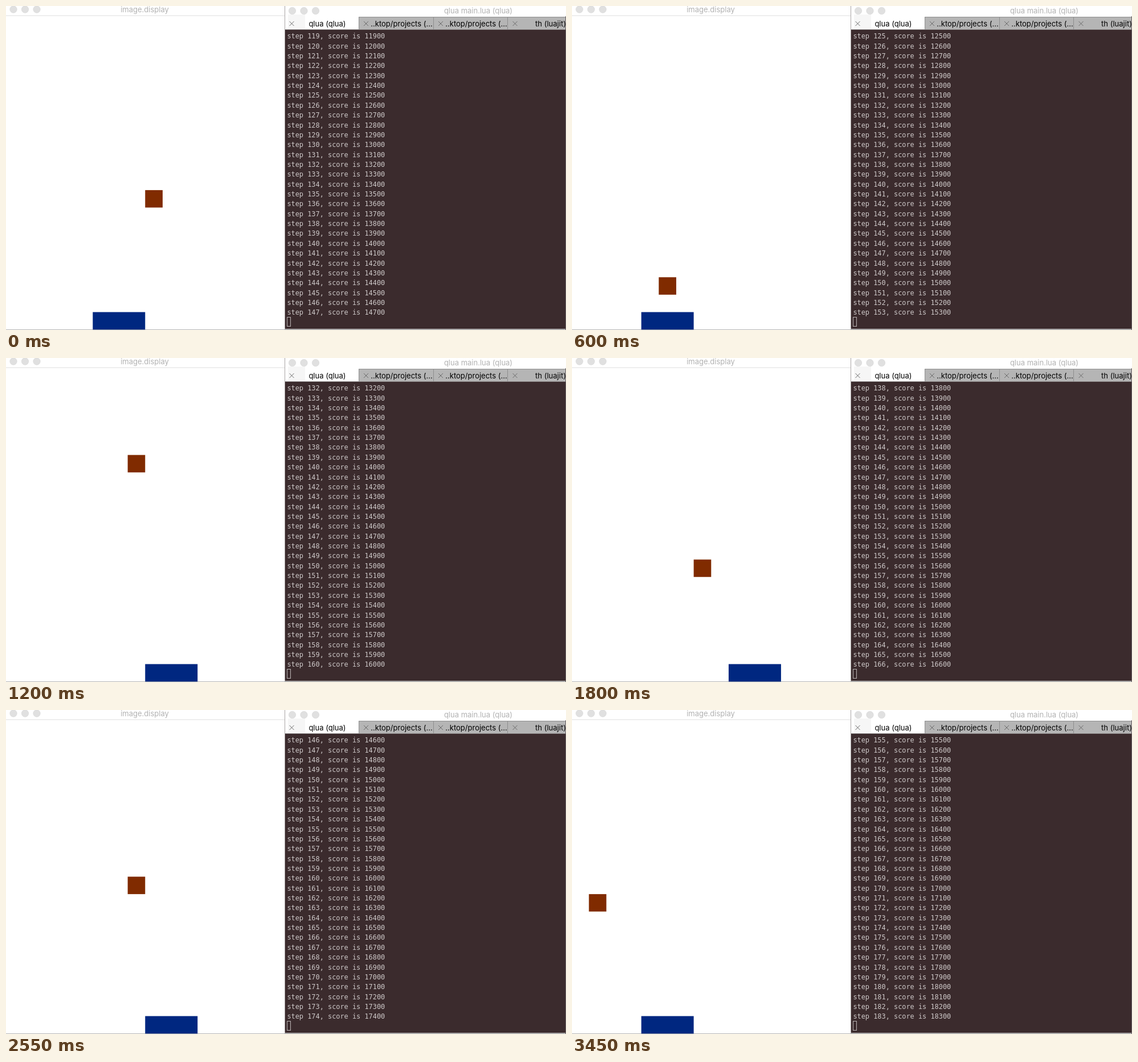
Recreate the animation shown at these times as an HTML page. Size 983 px wide and 570 px high, loop 3.6 s.

```html
<!DOCTYPE html>
<html lang="en">
<head>
<meta charset="utf-8">
<title>Catch</title>
<style>
  html, body { margin: 0; width: 100%; height: 100%; overflow: hidden; background: #fff; }
  svg { display: block; width: 983px; height: 570px; }
  .ui { font-family: Inter, Roboto, sans-serif; font-size: 13px; text-anchor: middle; }
  .title { fill: #b2b2b2; }
  .log { font-family: "DejaVu Sans Mono", monospace; font-size: 11.9px; fill: #cdc8c8; white-space: pre; }
</style>
</head>
<body>
<svg id="stage" viewBox="0 0 983 570" width="983" height="570"></svg>
<script>
const NS = "http://www.w3.org/2000/svg";
const stage = document.getElementById("stage");

function add(tag, attrs, text) {
  const el = document.createElementNS(NS, tag);
  for (const key in attrs) el.setAttribute(key, attrs[key]);
  if (text) el.textContent = text;
  return stage.appendChild(el);
}
const rect = (x, y, width, height, fill) => add("rect", { x, y, width, height, fill });
const label = (x, y, text, cls = "ui") => add("text", { x, y, class: cls }, text);
const lights = (xs, y) => xs.forEach(cx => add("circle", { cx, cy: y, r: 6.2, fill: "#e0e0e0", stroke: "#d6d6d6", "stroke-width": 0.6 }));

// Game window
const CELL = 30.66, TOP = 17.3;
rect(0, 0, 983, 570, "#fff");
lights([13, 33.5, 54], 6);
label(243.5, 11, "image.display", "ui title");
rect(0, 16.5, 489, 1, "#dedede");
rect(0, 569, 489, 1, "#b4b4b4");
const pad = rect(0, 538.5, CELL * 3, 30.7, "#002780");
const ball = rect(0, 0, CELL, CELL, "#802b00");

// Terminal window
rect(495, 15, 30, 26, "#f6f6f6");
lights([502.5, 523, 543.5], 8.5);
label(829, 13, "qlua main.lua (qlua)", "ui title");
rect(619, 19, 364, 22, "#b5b5b5");
rect(619, 19, 364, 1, "#8e8e8e");
[619, 750, 880].forEach(x => rect(x, 19, 1, 22, "#8e8e8e"));
const tabs = [[501.5, 564, "qlua (qlua)"], [632, 694.5, "..ktop/projects (..."],
  [763, 825.5, "..ktop/projects (..."], [893.5, 956, "th (luajit)"]];
tabs.forEach(([x, mid, text]) => {
  add("path", { d: `M${x - 4} 27l8 8m0-8l-8 8`, stroke: "#6c6c6c", "stroke-width": 1, fill: "none" });
  label(mid, 36, text);
});
rect(489, 41, 494, 1, "#8a8585");
rect(489, 42, 493, 526, "#3b2b2d");
rect(489, 0, 1, 570, "#a9a5a5");
rect(489, 568, 494, 1, "#d8d8d8");
rect(489, 569, 494, 1, "#8c8c8c");
rect(982, 18, 1, 552, "#6b6364");
add("rect", { x: 493.5, y: 547.5, width: 6, height: 16, fill: "none", stroke: "#b9b3b3" });

const LINES = 29;
const lines = Array.from({ length: LINES }, (_, i) => label(493.4, 57.3 + i * 17.357, "", "log"));

// One game per step; the ball falls one row per tick.
const LOOP = 3600, TICK = 150, ROWS = 17;
const pace = [[0, 147, 10], [4, 153, 15], [8, 160, 5], [12, 166, 11],
  [15, 171, 6], [19, 177, 12], [23, 183, 10]];
const ballCols = [8, 1, 10, 9, 5, 9, 3, 10, 7, 5, 2, 2, 7, 4, 8, 8, 2, 7, 11, 12, 5, 9, 6, 1];
const padCols = [5, 6, 9, 5, 4, 7, 6, 9, 8, 4, 5, 9, 9, 7, 7, 5, 1, 8, 9, 8, 7, 8, 7, 4];

function progress(n) {
  const i = Math.max(1, pace.findIndex(p => p[0] >= n));
  const [a, stepA, rowA] = pace[i - 1], [b, stepB, rowB] = pace[i];
  const from = stepA * ROWS + rowA, to = stepB * ROWS + rowB;
  return Math.floor(from + (to - from) * (n - a) / (b - a));
}

let shown = -1;
function draw(ms) {
  const n = Math.floor((ms % LOOP) / TICK);
  if (n === shown) return;
  shown = n;
  const ticks = progress(n), step = Math.floor(ticks / ROWS);
  ball.setAttribute("x", ballCols[n] * CELL - 1);
  ball.setAttribute("y", TOP + (ticks % ROWS) * CELL);
  pad.setAttribute("x", padCols[n] * CELL - 1);
  lines.forEach((line, i) => {
    const k = step - LINES + 1 + i;
    line.textContent = `step ${k}, score is ${k * 100}`;
  });
}

let start;
function loop(now) {
  if (start === undefined) start = now;
  draw(now - start);
  requestAnimationFrame(loop);
}
draw(0);
requestAnimationFrame(loop);
</script>
</body>
</html>
```
